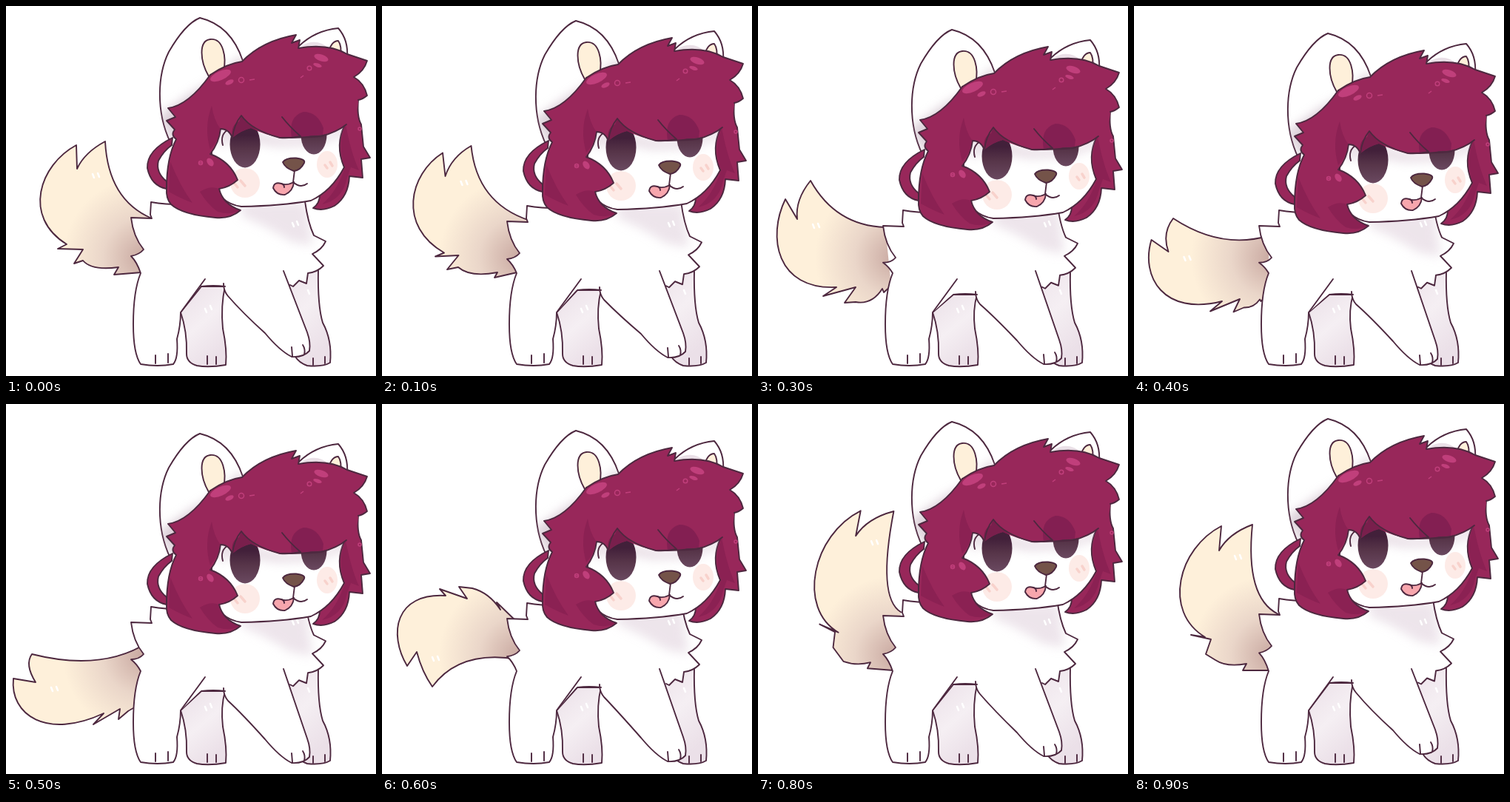
Recreate the animation shown at these times as an HTML page. Size 500 px wide and 500 px high, loop 1 s.

```html
<!DOCTYPE html>
<html lang="en">
<head>
<meta charset="utf-8">
<title>Wagging pup</title>
<style>
html, body { margin: 0; width: 100%; height: 100%; overflow: hidden; background: #fff; }
svg { display: block; width: 100vw; height: 100vh; }
.line { stroke: #4d283f; stroke-width: 1.9; stroke-linejoin: round; stroke-linecap: round; fill: none; }
.white { fill: #fff; }
.hair { fill: #98275a; }
.dark { fill: #861f50; opacity: .7; }
.shine { fill: #c03f7b; }
.ring { fill: none; stroke: #c03f7b; stroke-width: 1.5; }
.cream { fill: #fef0da; }
.blush { fill: #fdebe7; }
.mark { stroke: #f8d2cc; stroke-width: 3.5; stroke-linecap: round; }
.glint { stroke: #fff; stroke-width: 2.5; stroke-linecap: round; fill: none; }
</style>
</head>
<body>
<svg viewBox="0 0 500 500">
  <defs>
    <radialGradient id="tailFill" gradientUnits="userSpaceOnUse" cx="185" cy="340" r="108">
      <stop offset=".05" stop-color="#ccada5"/><stop offset=".5" stop-color="#ead6c9"/><stop offset="1" stop-color="#fef0da"/>
    </radialGradient>
    <linearGradient id="legFill" x1="0" y1="0" x2=".5" y2="1">
      <stop offset="0" stop-color="#ebe0e8"/><stop offset=".55" stop-color="#f5eff3"/><stop offset="1" stop-color="#ebe0e8"/>
    </linearGradient>
    <linearGradient id="eyeFill" x1="0" y1="0" x2="0" y2="1">
      <stop offset=".3" stop-color="#42203a"/><stop offset=".6" stop-color="#573549"/><stop offset="1" stop-color="#6a4960"/>
    </linearGradient>
    <filter id="soft" x="-50%" y="-50%" width="200%" height="200%"><feGaussianBlur stdDeviation="7"/></filter>
    <clipPath id="faceClip"><path d="M278 140V235Q288 267 318 271Q372 270 412 263Q440 250 457 218Q444 188 458 160V140Z"/></clipPath>
    <clipPath id="earClip"><path d="M222 184C202 142 205 92 220 62Q242 24 262 16Q304 26 320 74Z"/></clipPath>
    <clipPath id="torsoClip"><path id="torsoShape"/></clipPath>
  </defs>

  <path id="tail" class="line" style="fill:url(#tailFill)"/>
  <path id="tailGlint" class="glint"/>

  <path id="hind" class="line" style="fill:url(#legFill)"/>
  <path id="fore" class="line" style="fill:url(#legFill)"/>
  <path class="glint" d="M269 409l2 5M276 405l2 5M408 384l2 5"/>
  <path class="line" d="M272 473v11M284 474v10M415 476v9M431 474v9"/>

  <path id="torso" class="white"/>
  <g clip-path="url(#torsoClip)">
    <path id="chestShade" d="M318 265H406L414 324L384 318Q350 296 318 284Z" fill="#dccbd8" opacity=".5" filter="url(#soft)"/>
  </g>
  <path id="outline" class="line"/>
  <path class="line" d="M202 472v11M219 470v12"/>
  <path class="glint" d="M387 293l2 5M393 291l2 5"/>

  <g id="head">
    <!-- ears -->
    <path class="line white" d="M222 184C202 142 205 92 220 62Q242 24 262 16Q304 26 320 74"/>
    <g clip-path="url(#earClip)">
      <path d="M205 150L250 118L285 98L320 65V90L230 190Z" fill="#b79fb0" opacity=".5" filter="url(#soft)"/>
    </g>
    <path class="line cream" d="M274 95C262 74 260 47 276 45C294 43 298 70 294 88"/>
    <path class="line white" d="M396 54Q418 33 449 30Q463 46 461 70"/>
    <path d="M399 54Q420 42 437 58L424 62Z" fill="#dccbd8" opacity=".6"/>
    <path class="line cream" d="M436 62Q440 47 449 47Q454 54 452 68"/>

    <!-- side hair behind the face -->
    <path class="line hair" d="M225 178Q190 195 191 219Q196 243 217 247L217 237Q202 225 206 209Q213 196 224 188Z"/>
    <path class="line hair" d="M440 120L476 127Q474 150 480 160L483 190L492 205L480 207L482 232L464 230Q463 257 444 270Q428 278 415 273Q424 267 424 255Z"/>
    <path class="dark" d="M458 218Q448 250 427 268Q455 262 461 232L466 218L477 222Q466 198 459 160Q447 188 458 218Z"/>

    <!-- face -->
    <path class="line white" d="M278 140V235Q288 267 318 271Q372 270 412 263Q440 250 457 218Q444 188 458 160V140Z"/>
    <g clip-path="url(#faceClip)">
      <path d="M285 165L315 165L374 178L430 175L462 155V172L420 188L366 190L310 180L288 190Z" fill="#cdb5c6" opacity=".45" filter="url(#soft)"/>
      <circle class="blush" cx="323" cy="239" r="20"/>
      <ellipse class="blush" cx="434" cy="214" rx="14" ry="18"/>
      <path class="mark" d="M309 240l4 5M317 236l6 7M431 215l3 4M438 211l3 5"/>
    </g>
    <ellipse cx="323" cy="187" rx="20.5" ry="31.5" fill="url(#eyeFill)"/>
    <ellipse cx="416" cy="174" rx="17.5" ry="26.5" fill="url(#eyeFill)"/>
    <path class="line" d="M300 167Q289 174 293 188"/>
    <path class="line" d="M389 238Q379 243 372 240Q362 237 361 246Q366 256 377 255Q388 250 389 238" style="fill:#f7a6ad"/>
    <path class="line" d="M372 240q4 1 4 5M390 222L388 238Q398 247 407 240"/>
    <path class="line" d="M374 211Q378 205 392 205.5Q405 207 403 212Q398 222 389 223Q377 219 374 211Z" style="fill:#745349"/>

    <!-- main hair -->
    <path class="hair" d="M276 93Q298 78 319 75Q346 47 392 39L386 50L397 46L395 57Q435 50 461 65L488 74Q484 88 470 96Q484 104 488 121Q482 126 476 127Q476 148 460 160Q440 176 412 175Q392 180 370 178Q350 174 331 165Q318 168 306 178Q301 166 290 166Q288 185 276 200Q303 210 313 235Q302 245 288 247Q293 268 317 276Q303 288 283 286Q238 282 223 268Q216 260 217 247Q217 205 230 180Q222 174 228 167L217 155L229 150L219 138Q247 134 276 93Z"/>
    <path class="dark" d="M278 135Q281 154 289 165Q288 182 276 194Q267 164 278 135Z"/>
    <path class="dark" d="M288 247Q276 242 262 251Q272 268 286 278Q302 283 316 277Q293 267 288 247ZM222 210Q235 243 252 266Q238 261 220 251Z"/>
    <path d="M306 178Q303 161 315 156L318 148Q329 160 340 169L331 165Q317 168 306 178Z" fill="#651943" opacity=".6"/>
    <path d="M386 178Q381 149 402 143Q421 143 429 165L428 174Q408 176 386 178Z" fill="#70194a" opacity=".5"/>
    <path class="line" d="M276 93Q298 78 319 75Q346 47 392 39L386 50L397 46L395 57Q435 50 461 65L488 74Q484 88 470 96Q484 104 488 121Q482 126 476 127"/>
    <path class="line" d="M276 93Q247 134 219 138L229 150L217 155L228 167Q222 174 230 180Q217 205 217 247Q216 260 223 268Q238 282 283 286Q303 288 317 276Q293 268 288 247Q302 245 313 235Q303 210 276 200Q288 185 290 166Q301 166 306 178Q308 160 318 148Q332 168 370 178Q384 179 398 176Q384 164 373 150M370 178Q402 178 426 176Q448 170 460 160"/>
    <ellipse class="shine" cx="290" cy="94" rx="15" ry="6" transform="rotate(-24 290 94)"/>
    <ellipse class="shine" cx="302" cy="103" rx="6" ry="3" transform="rotate(-24 302 103)"/>
    <circle class="ring" cx="318" cy="100" r="3.5"/>
    <path class="ring" d="M329 100l7-1M260 212h5M398 97l4-3"/>
    <ellipse class="shine" cx="426" cy="70" rx="10" ry="4.5" transform="rotate(18 426 70)"/>
    <ellipse class="shine" cx="421" cy="80" rx="6" ry="2.5" transform="rotate(18 421 80)"/>
    <circle class="ring" cx="410" cy="84" r="2.8"/>
    <ellipse class="shine" cx="276" cy="211" rx="4" ry="6" transform="rotate(-35 276 211)"/>
    <circle class="ring" cx="263" cy="212" r="2.5"/>
    <circle class="ring" cx="478" cy="166" r="2"/>
  </g>
</svg>
<script>
const $ = id => document.getElementById(id);
const draw = (id, d) => $(id).setAttribute('d', d);

// Vertical travel of each part, one value per 100 ms
const headY = [0, 4, 7, 16, 21, 24, 20, 12, 8, 4];
const bodyY = [0, 5, 7.5, 11, 11, 9, 4, 2.5, 0, -2];
const pawY = [0, 1, 2, 10, 11, 11, 9, 5, 2, -1];

// Tail poses by step
const tails = {
  0: 'M197 287Q138 262 134 183Q106 198 96 220L95 188C45 215 22 285 82 322L70 328L104 329L92 348L104 344Q116 358 152 353L146 363L183 360',
  2: 'M200 292Q118 270 107 195Q82 210 75 240L69 209C28 240 20 310 86 345L74 349L103 345L84 364L102 362Q122 376 160 367L158 371L182 360',
  3: 'M172 299Q105 297 71 236Q50 262 53 288L37 261C12 312 25 384 106 380L88 392L132 380L117 401L132 400Q154 404 168 382L170 387L180 378',
  5: 'M192 322Q130 362 35 338Q25 352 40 376L10 371C5 420 55 454 132 418L118 433L154 412L152 426L165 415Q170 412 172 411L173 411L185 400',
  6: 'M183 345Q105 332 68 382Q54 362 47 335L34 354C8 310 18 255 86 259L78 250L115 263L104 247L122 249Q145 255 160 278L155 268L188 300',
  7: 'M186 333Q148 275 63 290Q58 268 72 240L48 246C45 190 95 165 152 210L142 196L166 218L170 211L183 222Q198 240 199 262L200 264L200 275',
  9: 'M195 284Q150 262 160 163Q128 175 115 198L118 165C60 195 38 280 96 315L77 312L104 318L97 338L110 346Q125 356 152 351L147 360L183 360'
};

// Point-by-point mix of two paths; k above 1 swings past the second
function blend(a, b, k) {
  const nums = b.match(/\d+/g);
  let i = 0;
  return a.replace(/\d+/g, n => +n + (nums[i++] - n) * k);
}
tails[1] = blend(tails[0], tails[2], .5);
tails[4] = blend(tails[3], tails[5], .5);
tails[8] = blend(tails[0], tails[9], 1.9);

function pose(step) {
  const b = bodyY[step], q = pawY[step], f = b * 0.25;
  const tail = tails[step];
  const [nx, ny] = tail.match(/[\d.]+/g).slice(8, 10).map(Number);
  draw('tail', tail);
  draw('tailGlint', `M${nx + 21} ${ny + 7}l2 5M${nx + 28} ${ny + 6}l2 5`);

  const back = `M250 ${268 + b}Q220 ${269 + b} 196 ${265 + b}L195 ${282 + b}L197 ${287 + b}L169 ${286 + b}` +
    `Q172 ${312 + b} 186 ${329 + b}Q180 ${336 + b} 169 ${338 + b * .8}Q177 ${346 + b * .6} 182 361`;
  const leg = 'Q172 385 172 430Q172 470 182 484Q205 488 226 484Q233 476 231 450Q236 432 236 414';
  const paw = `M294 ${375 + b}Q294 ${385 + b} 300 ${392 + b}Q320 ${415 + b / 2} 350 ${442 + q}` +
    `Q370 ${466 + q} 386 ${474 + q}Q402 ${475 + q} 410 ${466 + q}Q412 ${455 + q} 407 ${441 + q}L375 358`;
  const toes = `M386 ${461 + q}l1 12M401 ${458 + q}q4 6 2 13`;
  const chest = `M404 264Q408 ${293 + f} 416 ${310 + f}L432 ${318 + f}Q427 ${329 + f} 414 ${335 + f}` +
    `L429 ${351 + f}Q420 ${360 + f} 408 ${361 + f}`;
  const tuft = `L406 ${375 + f}L396 ${371 + f}L388 ${379 + f}L384 ${377 + f}`;
  const belly = `M264 ${379 + b}Q280 ${377 + b} 296 ${379 + b}`;
  draw('outline', back + leg + 'L269 369' + belly + paw + chest + tuft + toes);

  const shape = back + leg + `L262 ${379 + b}L296 ${379 + b}` + paw.replace('M', 'L') +
    `L384 ${377 + f}L388 ${379 + f}L396 ${371 + f}L406 ${375 + f}L408 ${361 + f}Q420 ${360 + f} 429 ${351 + f}` +
    `L414 ${335 + f}Q427 ${329 + f} 432 ${318 + f}L416 ${310 + f}Q408 ${293 + f} 404 264Z`;
  draw('torso', shape);
  draw('torsoShape', shape);

  draw('hind', `M236 414L264 ${379 + b}H296Q290 ${405 + b / 2} 293 436Q299 465 297 485Q274 489 258 486` +
    `Q244 482 244 470Q245 440 236 414`);
  draw('fore', `M366 350L422 ${356 + f}Q421 405 428 428Q441 452 438 482Q428 488 407 486Q396 482 391 474L396 440Z`);
  $('chestShade').setAttribute('transform', `translate(0 ${headY[step] * .7})`);
  $('head').setAttribute('transform', `translate(0 ${headY[step]})`);
}

const start = performance.now();
let last = -1;
function tick() {
  const step = Math.floor((performance.now() - start) / 100) % 10;
  if (step !== last) pose(last = step);
  requestAnimationFrame(tick);
}
tick();
</script>
</body>
</html>
```
